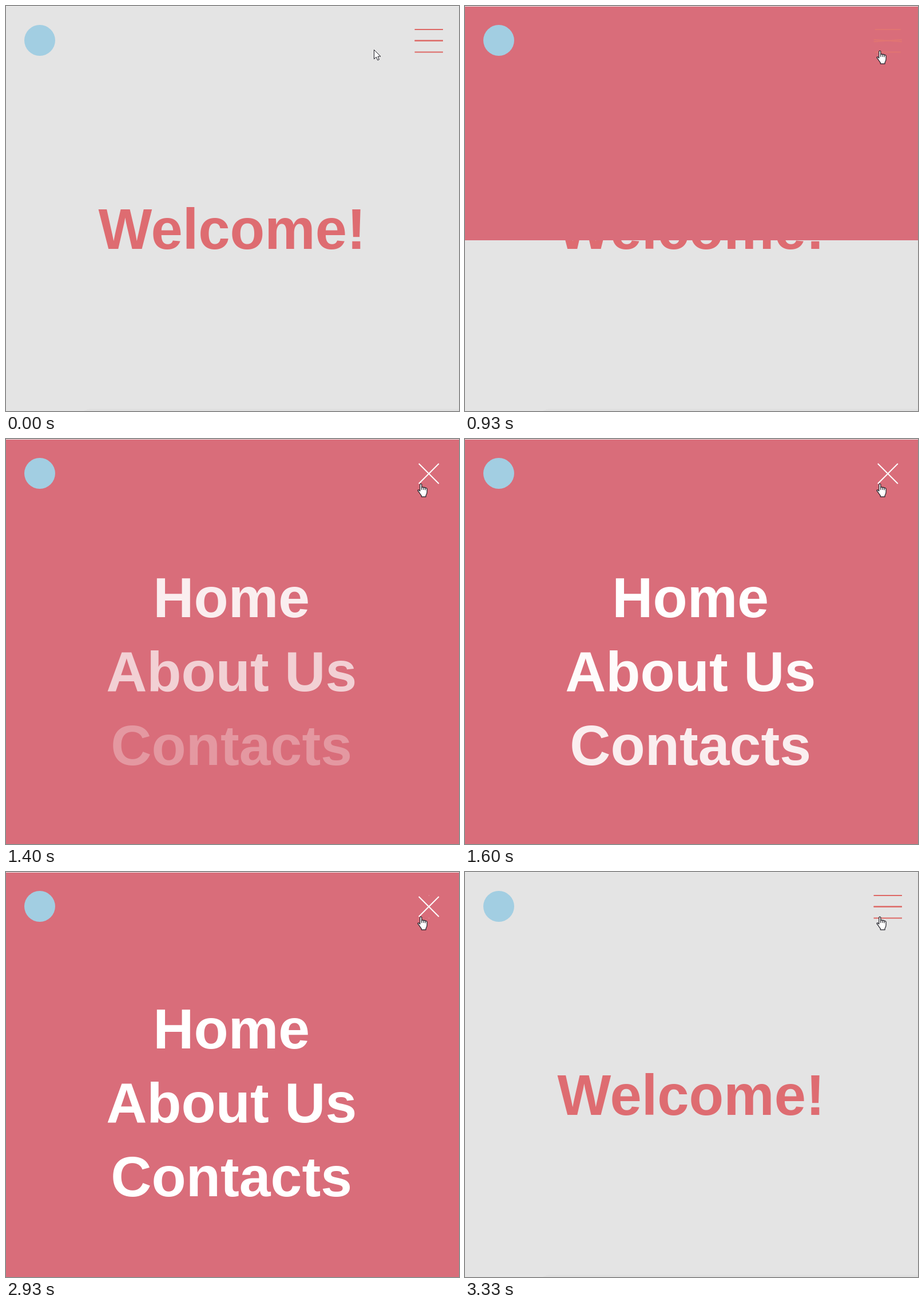
Animation, 792 px wide and 707 px high, one loop 3540 ms. Source, as an HTML page:

```html
<!DOCTYPE html>
<html lang="en">
<head>
<meta charset="utf-8">
<title>Full-screen menu</title>
<style>
  html, body { margin: 0; width: 100%; height: 100%; overflow: hidden; background: #e4e4e4; }
  svg { display: block; width: 792px; height: 707px; }
  text { font: bold 99.4px "Liberation Sans", Arial, sans-serif; text-anchor: middle; }
  #items text { font-size: 98.6px; }
</style>
</head>
<body>
<svg viewBox="0 0 792 707" xmlns="http://www.w3.org/2000/svg">
  <rect width="792" height="707" fill="#e4e4e4"/>
  <path d="M136 707 Q142 703 152 703 H792 V707 Z" fill="#dfdfdf"/>
  <text x="395.2" y="424" fill="#de6c71">Welcome!</text>

  <g id="panel">
    <rect width="792" height="707" fill="#d96d7a"/>
    <g id="items" fill="#fff">
      <text x="394.2" y="308">Home</text>
      <text x="394.2" y="437">About Us</text>
      <text x="394.2" y="566">Contacts</text>
    </g>
  </g>

  <rect width="792" height="1" fill="#ededed"/>
  <circle cx="59" cy="60" r="27" fill="#a2cee2"/>

  <g id="burger" stroke-width="2">
    <line id="top" y1="41" y2="41"/>
    <line id="low" y1="80.5" y2="80.5"/>
    <line id="armA" x1="714.5" x2="764" y1="60.5" y2="60.5"/>
    <line id="armB" x1="714.5" x2="764" y1="60.5" y2="60.5"/>
  </g>

  <g id="cursor" fill="#fff" stroke="#1c1c24" stroke-linejoin="round">
    <path id="arrow" d="M.5 .5 V16.5 L4.3 13 L6.8 18.6 L9.4 17.5 L7 12 H12 Z"/>
    <path id="hand" stroke-width="1.2" d="M-1.5 1.5 Q0 -1 1.5 1.5 V8 L2 6.5 Q3.7 5.5 4.8 7
      Q6.6 6 7.8 7.8 Q9.8 7.2 10.8 9.2 V15 Q10.6 18.5 8.8 20.5 V23 H1 V21
      Q-1.6 18 -3.2 15 Q-5.8 12.4 -5 11.2 Q-3.4 10.4 -1.5 13 Z M4.8 7 V11 M7.8 8 V11.5 M1.5 7 V11"/>
  </g>
</svg>
<script>
  const LOOP = 3540, TICK = 1000 / 15;
  const $ = id => document.getElementById(id);
  const clamp = x => Math.min(1, Math.max(0, x));
  const mix = (a, b, k) => a + (b - a) * k;

  function bezier(x1, y1, x2, y2) {
    const at = (a, b, u) => 3 * a * u * (1 - u) ** 2 + 3 * b * u * u * (1 - u) + u ** 3;
    return x => {
      if (x <= 0 || x >= 1) return clamp(x);
      let lo = 0, hi = 1;
      for (let i = 0; i < 24; i++) {
        const mid = (lo + hi) / 2;
        if (at(x1, x2, mid) < x) lo = mid; else hi = mid;
      }
      return at(y1, y2, lo);
    };
  }
  const ease = bezier(.25, .1, .25, 1);
  const easeInOut = bezier(.42, 0, .58, 1);
  const tween = (t, start, length, curve = ease) => curve(clamp((t - start) / length));

  function drawPanel(t) {
    const open = tween(t, 866, 201) - tween(t, 2933, 296);
    $("panel").setAttribute("transform", `translate(0 ${Math.round(707 * (open - 1))})`);

    const settle = 3 * (1 - tween(t, 1930, 470, easeInOut));
    $("items").setAttribute("transform", `translate(0 ${settle})`);
    const leave = 1 - tween(t, 2933, 200);
    [...$("items").children].forEach((item, i) => {
      item.setAttribute("opacity", tween(t, 1100 + 100 * i, 500) * leave);
    });
  }

  function drawBurger(t) {
    const k = tween(t, 866, 330, easeInOut) - tween(t, 2917, 330, easeInOut);
    const half = 24.75 * (1 - k);
    for (const id of ["top", "low"]) {
      $(id).setAttribute("x1", 739.25 - half);
      $(id).setAttribute("x2", 739.25 + half);
      $(id).setAttribute("visibility", half > .1 ? "visible" : "hidden");
    }
    $("armA").setAttribute("transform", `rotate(${45 * k} 739.25 60.5)`);
    $("armB").setAttribute("transform", `rotate(${-45 * k} 739.25 60.5)`);
    const rgb = [222, 104, 101].map(c => Math.round(mix(c, 255, k)));
    $("burger").setAttribute("stroke", `rgb(${rgb})`);
  }

  function drawCursor(t) {
    const k = tween(t, 30, 370, easeInOut);
    const x = mix(643, 725.3, k), y = mix(76, 77.8, k);
    const over = x >= 714;
    $("cursor").setAttribute("transform", `translate(${x} ${y})`);
    $("arrow").setAttribute("display", over ? "none" : "inline");
    $("hand").setAttribute("display", over ? "inline" : "none");
  }

  function draw(now) {
    // The screen refreshes 15 times a second.
    const t = Math.floor((now % LOOP + 4) / TICK) * TICK;
    drawPanel(t);
    drawBurger(t);
    drawCursor(t);
  }

  let start;
  function frame(now) {
    start ??= now;
    draw(now - start);
    requestAnimationFrame(frame);
  }
  draw(0);
  requestAnimationFrame(frame);
</script>
</body>
</html>
```
